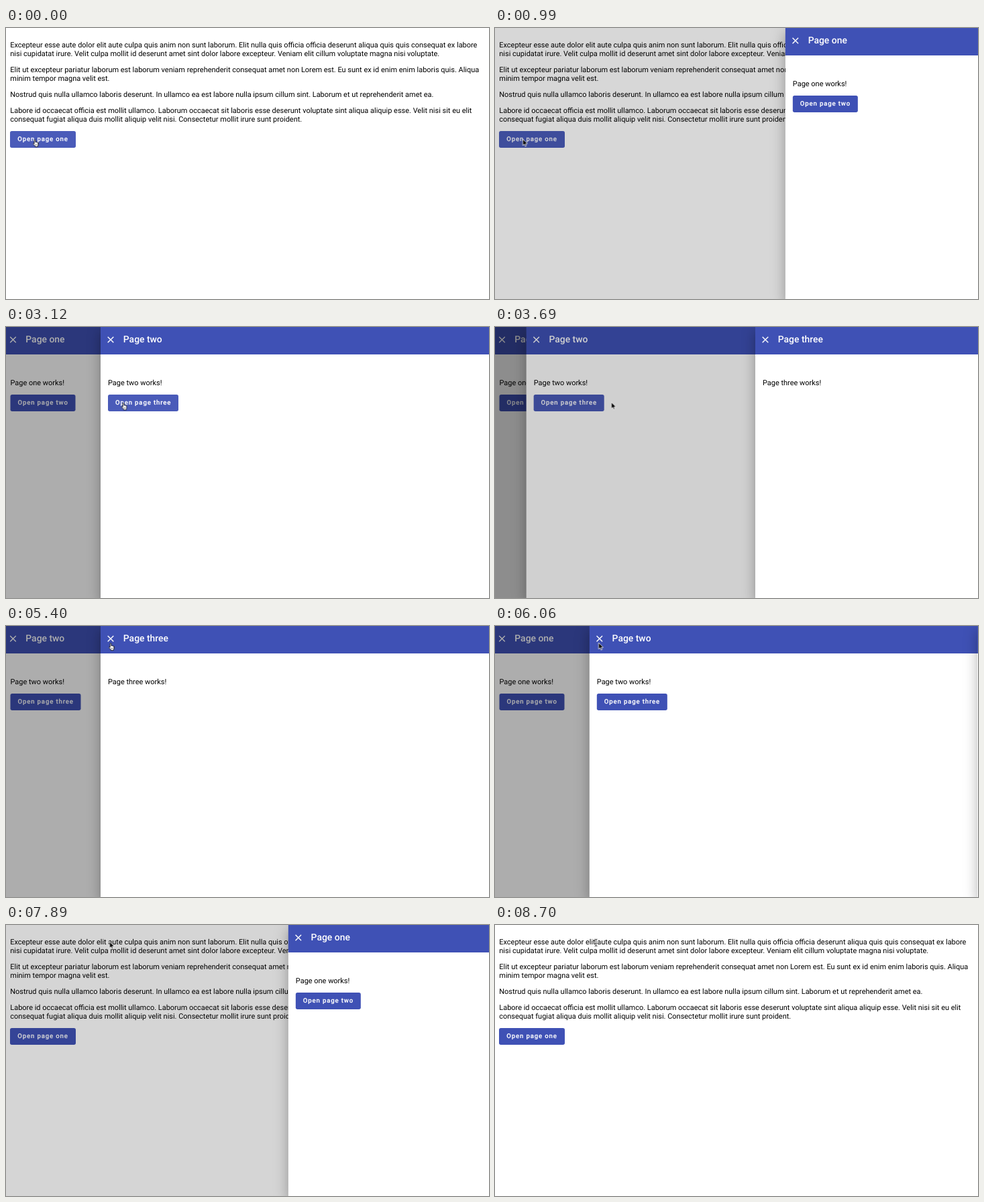
An HTML page for the animation above (9.18 s loop, 720 by 405 pixels).

```html
<!DOCTYPE html>
<html lang="en">
<head>
<meta charset="utf-8">
<title>Stacked side pages</title>
<style>
html, body { margin: 0; width: 100%; height: 100%; overflow: hidden; background: #fff; }
body {
  --loop: 9180ms;
  --ease: cubic-bezier(.25, .8, .25, 1);
  position: relative;
  font: 10.96px/13px Roboto, sans-serif;
  color: #000;
  text-rendering: geometricPrecision;
}
#stage { position: absolute; left: 0; top: 0; width: 720px; height: 405px; overflow: hidden; }
p { margin: 0 0 11px; white-space: nowrap; }
.root { position: absolute; left: 6.3px; top: 19px; }

.btn {
  position: relative; display: inline-block; overflow: hidden; vertical-align: top;
  height: 24.66px; padding: 0 10.96px; border-radius: 2.74px;
  background: #3f51b5; color: #fff;
  font-weight: 500; font-size: 9.59px; line-height: 26.4px; letter-spacing: .857px;
  white-space: nowrap; -webkit-text-stroke: .2px #fff;
}
.btn::before, .btn::after { content: ""; position: absolute; background: #fff; opacity: 0; }
.btn::before {
  left: -72px; top: -88px; width: 200px; height: 200px; border-radius: 50%;
  animation: ripple var(--loop) var(--press) linear infinite;
}
.btn::after { inset: 0; animation: hover var(--loop) var(--over) step-end infinite; }

.scrim { position: absolute; inset: 0; background: #000; opacity: 0; }
.panel {
  position: absolute; left: 0; top: 0; width: 579px; height: 405px;
  background: linear-gradient(#3f51b5 41px, #fff 41px);
  visibility: hidden; transform: translateX(720px);
  box-shadow: 0 5.5px 6.9px -3.4px rgba(0,0,0,.2), 0 11px 16.4px 1.4px rgba(0,0,0,.14), 0 4.1px 20.5px 3.4px rgba(0,0,0,.12);
}
.scrim, .panel { animation: var(--run) var(--loop) var(--ease) infinite; }
.bar { color: #fff; }
.bar svg { position: absolute; left: 10.3px; top: 14px; fill: none; stroke: #fff; stroke-width: 1.4; }
.bar b { position: absolute; left: 33.8px; top: 0; font-weight: 500; font-size: 13.9px; line-height: 38px; white-space: nowrap; }
.body { position: absolute; left: 11px; top: 77px; }

#cursor { position: absolute; left: 0; top: 0; width: 20px; height: 20px; overflow: visible; animation: move var(--loop) ease-in-out infinite; }
#cursor g { opacity: 0; animation: var(--show) var(--loop) step-end infinite; }

@keyframes panel1 {
  0%, 10.111%, 89.651%, 100% { transform: translateX(720px); visibility: hidden; }
  14.468%, 26.053%, 78.91%, 85.294% { transform: translateX(141px); visibility: visible; }
  30.41%, 74.553% { transform: translateX(-4.5px); visibility: visible; }
}
@keyframes panel2 {
  0%, 26.191%, 78.91%, 100% { transform: translateX(720px); visibility: hidden; }
  30.548%, 39.253%, 66.449%, 74.553% { transform: translateX(141px); visibility: visible; }
  43.61%, 62.092% { transform: translateX(-4.5px); visibility: visible; }
}
@keyframes panel3 {
  0%, 39.395%, 66.449%, 100% { transform: translateX(720px); visibility: hidden; }
  43.752%, 62.092% { transform: translateX(141px); visibility: visible; }
}
@keyframes scrim1 {
  0%, 10.111%, 89.651%, 100% { opacity: 0; }
  14.468%, 85.294% { opacity: .32; }
}
@keyframes scrim2 {
  0%, 26.191%, 78.91%, 100% { opacity: 0; }
  30.548%, 74.553% { opacity: .32; }
}
@keyframes scrim3 {
  0%, 39.395%, 66.449%, 100% { opacity: 0; }
  43.752%, 62.092% { opacity: .32; }
}
@keyframes hover {
  0% { opacity: .06; }
  11%, 100% { opacity: 0; }
}
@keyframes ripple {
  0% { transform: scale(0); opacity: .04; }
  2.3% { transform: scale(1); opacity: .04; }
  2.6%, 100% { transform: scale(1); opacity: 0; }
}
@keyframes move {
  0%, 14.16% { transform: translate(41.5px, 166px); }
  24%, 48.69% { transform: translate(173.5px, 112.5px); }
  58.5%, 100% { transform: translate(154.5px, 25px); }
}
@keyframes arrow {
  0%, 22.65%, 33.98%, 58.8%, 68.29%, 83%, 94.76%, 100% { opacity: 0; }
  10.12%, 26.14%, 39.39%, 62.09%, 74.53%, 85.29% { opacity: 1; }
}
@keyframes hand {
  0%, 22.65%, 33.98%, 58.8%, 68.29%, 83% { opacity: 1; }
  10.12%, 26.14%, 39.39%, 62.09%, 74.53%, 85.29%, 100% { opacity: 0; }
}
@keyframes beam {
  0% { opacity: 0; }
  94.76%, 100% { opacity: 1; }
}
</style>
</head>
<body>
<div id="stage">
  <div class="root">
    <p>Excepteur esse aute dolor elit aute culpa quis anim non sunt laborum. Elit nulla quis officia officia deserunt aliqua quis quis consequat ex labore<br>nisi cupidatat irure. Velit culpa mollit id deserunt amet sint dolor labore excepteur. Veniam elit cillum voluptate magna nisi voluptate.</p>
    <p>Elit ut excepteur pariatur laborum est laborum veniam reprehenderit consequat amet non Lorem est. Eu sunt ex id enim enim laboris quis. Aliqua<br>minim tempor magna velit est.</p>
    <p>Nostrud quis nulla ullamco laboris deserunt. In ullamco ea est labore nulla ipsum cillum sint. Laborum et ut reprehenderit amet ea.</p>
    <p>Labore id occaecat officia est mollit ullamco. Laborum occaecat sit laboris esse deserunt voluptate sint aliqua aliquip esse. Velit nisi sit eu elit<br>consequat fugiat aliqua duis mollit aliquip velit nisi. Consectetur mollit irure sunt proident.</p>
    <span class="btn" style="--over: 0ms; --press: 750ms">Open page one</span>
  </div>

  <div class="scrim" style="--run: scrim1"></div>
  <div class="panel" style="--run: panel1">
    <div class="bar"><svg width="10" height="10"><path d="M.7 .7l8.6 8.6M9.3 .7l-8.6 8.6"/></svg><b>Page one</b></div>
    <div class="body">
      <p>Page one works!</p>
      <span class="btn" style="--over: 2080ms; --press: 2225ms">Open page two</span>
    </div>
  </div>

  <div class="scrim" style="--run: scrim2"></div>
  <div class="panel" style="--run: panel2">
    <div class="bar"><svg width="10" height="10"><path d="M.7 .7l8.6 8.6M9.3 .7l-8.6 8.6"/></svg><b>Page two</b></div>
    <div class="body">
      <p>Page two works!</p>
      <span class="btn" style="--over: 3120ms; --press: 3450ms">Open page three</span>
    </div>
  </div>

  <div class="scrim" style="--run: scrim3"></div>
  <div class="panel" style="--run: panel3">
    <div class="bar"><svg width="10" height="10"><path d="M.7 .7l8.6 8.6M9.3 .7l-8.6 8.6"/></svg><b>Page three</b></div>
    <div class="body"><p>Page three works!</p></div>
  </div>

  <svg id="cursor" viewBox="0 0 20 20" stroke-linejoin="round">
    <g style="--show: arrow"><path d="M0 0V9.6L2.2 7.6L3.7 11L5.2 10.3L3.8 7.1H6.8Z" stroke="#fff" stroke-width=".8"/></g>
    <g style="--show: hand">
      <path d="M.7 1.7Q.7 .8 1.5 .8T2.4 1.7V4.5Q3.1 4 3.7 4.7Q4.5 4.3 5 5Q6.3 4.7 6.3 6V8.4Q6.3 9.4 5.6 10.3V11.6H2V10.6L-1 7.4Q-1.4 6.5 -.5 6.3L.7 7.1Z" fill="#fff" stroke="#000" stroke-width=".8"/>
      <path d="M2.7 7.6v2M4 7.6v2" stroke="#000" stroke-width=".5"/>
    </g>
    <g style="--show: beam"><path d="M-5.8 -3.8Q-4.2 -3.8 -4 -2.8Q-3.8 -3.8 -2.2 -3.8M-4 -2.8V5.6M-5.8 6.6Q-4.2 6.6 -4 5.6Q-3.8 6.6 -2.2 6.6M-5 2.6H-3" fill="none" stroke="#000" stroke-width=".9"/></g>
  </svg>
</div>
</body>
</html>
```
